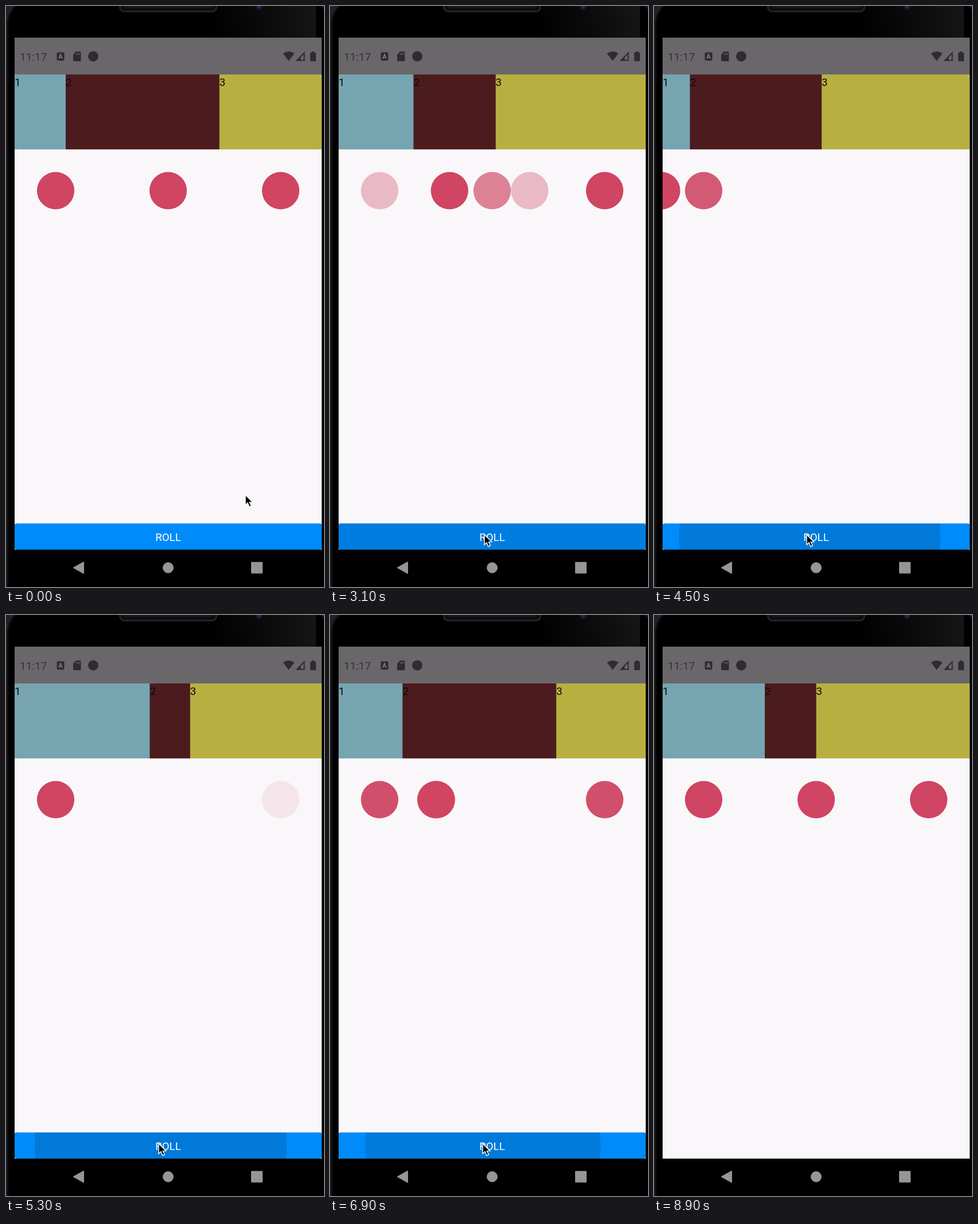
An HTML page that plays this animation: 554x1010 px, repeating every 9.6 s.

```html
<!DOCTYPE html>
<html lang="en">
<head>
<meta charset="utf-8">
<title>Roll</title>
<style>
  html, body { margin: 0; width: 100%; height: 100%; overflow: hidden; background: #000; }
  svg { display: block; }
  text { font-family: Roboto, "Liberation Sans", sans-serif; font-size: 18.7px; }
</style>
</head>
<body>
<svg width="554" height="1010" viewBox="0 0 554 1010">
  <defs>
    <clipPath id="screen"><rect x="15" y="55" width="535" height="890"/></clipPath>
    <clipPath id="pill"><rect x="15" y="899.500" width="535" height="45.500" rx="3"/></clipPath>
    <linearGradient id="glass" gradientUnits="userSpaceOnUse" x1="360" x2="550" y1="50" y2="10">
      <stop offset="0" stop-color="#000"/>
      <stop offset="0.6" stop-color="#0d0d0d"/>
      <stop offset="1" stop-color="#171717"/>
    </linearGradient>
    <radialGradient id="lens">
      <stop offset="0" stop-color="#25365c"/>
      <stop offset="0.5" stop-color="#121a2e"/>
      <stop offset="1" stop-color="#0b0c10" stop-opacity="0"/>
    </radialGradient>
  </defs>

  <!-- phone -->
  <rect width="554" height="1010" fill="#202123"/>
  <rect x="3.500" y="-14" width="558" height="1100" rx="46" fill="#000" stroke="#0b0b0c" stroke-width="3"/>
  <rect x="360" y="0" width="180" height="55" fill="url(#glass)"/>
  <rect x="198.500" y="-14" width="168" height="23.500" rx="7" fill="#0c0c0d" stroke="#29292b" stroke-width="2.500"/>
  <rect x="204" y="-14" width="157" height="18" rx="5" fill="#161617"/>
  <circle cx="441" cy="1.500" r="8" fill="url(#lens)"/>

  <!-- status bar -->
  <rect x="15" y="55" width="535" height="64" fill="#6a676a"/>
  <g fill="#2e2c30">
    <text x="24" y="95" fill="#353337" style="font-size:19px">11:17</text>
    <rect x="88.500" y="80.500" width="13" height="14.500" rx="2"/>
    <path d="M92 91.500 95 84l3 7.500M93 89.300h4" fill="none" stroke="#8b888b" stroke-width="1.300"/>
    <path d="M122 79h7a1.500 1.500 0 0 1 1.500 1.500v14a1.500 1.500 0 0 1-1.500 1.500h-10.500a1.500 1.500 0 0 1-1.500-1.500V84.500z"/>
    <path d="M122.500 81.500v3.500M125.200 81.500v3.500M128 81.500v3.500" stroke="#6a676a" stroke-width="1.200"/>
    <circle cx="152" cy="87.500" r="9"/>
    <path d="M482.500 82.500Q492.500 75.500 502.500 82.500L492.500 95.500Z"/>
    <path d="M520.500 79v16.500H504.500ZM518.500 84 513.500 89.200V93.500H518.500Z" fill-rule="evenodd"/>
    <path d="M533 79h4v1.800h2a1 1 0 0 1 1 1V95a1 1 0 0 1-1 1h-8a1 1 0 0 1-1-1V81.800a1 1 0 0 1 1-1h2z"/>
  </g>

  <!-- app -->
  <rect x="15" y="249" width="535" height="696" fill="#f9f7fa"/>
  <g clip-path="url(#screen)">
    <g id="boxes"></g>
    <g id="dots" fill="#cf4562"></g>
  </g>
  <g id="button">
    <g clip-path="url(#pill)">
      <rect x="15" y="899" width="535" height="46" fill="#008bfa"/>
      <circle id="ripple" cy="922"/>
    </g>
    <text x="282.500" y="930" text-anchor="middle" fill="#fff">ROLL</text>
  </g>

  <!-- navigation -->
  <g fill="#969696" stroke="#969696" stroke-linejoin="round">
    <path d="M118 976.500 135 967v19z" stroke-width="2"/>
    <circle cx="282.500" cy="976.500" r="9"/>
    <rect x="428" y="967.500" width="18" height="18" stroke-width="2"/>
  </g>

  <path id="cursor" d="M0 0V17.500L4 13.800 6.900 20.700 10.300 19.200 7.400 12.600H12.600Z"
        fill="#000" stroke="#fff" stroke-width="1.400"/>
</svg>
<script>
const LOOP = 9600, END = 8390, FADE = 500;
const LEFT = 15, WIDTH = 535;
const colors = ['#76a4b1', '#4c1b1e', '#b8af41'];

// Each roll: time, flex weights, circle ids from left to right,
// how long before it the finger went down, ids that vanish at once.
const rolls = [
  { at: -5000, flex: [1, 3, 2], ids: 'abc' },
  { at: 2929, flex: [1, 1, 2], ids: 'napc' },
  { at: 3690, flex: [3, 3, 1], ids: 'nc' },
  { at: 4440.3, flex: [1, 3, 3], ids: 'c' },
  { at: 5250, flex: [3, 1, 3], ids: 'cd' },
  { at: 6082.2, flex: [1, 2, 1], ids: 'cefdg' },
  { at: 6872.8, flex: [1, 3, 2], ids: 'f', lead: 62, lost: 'd' },
  { at: 7650, flex: [2, 3, 1], ids: 'fh' },
  { at: END, flex: [2, 1, 3], ids: 'fih' }
];

const cursorPath = [[0, 417, 850], [100, 417, 850], [1000, 389, 922], [1500, 389, 922],
  [2400, 269, 919], [3100, 269, 919], [3500, 266, 919], [LOOP, 266, 919]];

const $ = id => document.getElementById(id);
const clamp = v => Math.max(0, Math.min(1, v));
const mix = (a, b, p) => a + (b - a) * p;
const smooth = p => p * p * (3 - 2 * p);

function spring(t) {
  const s = 0.043 * t, z = 0.37, w = Math.sqrt(1 - z * z);
  return 1 - Math.exp(-z * s) * (Math.cos(w * s) + z / w * Math.sin(w * s));
}

function edges([a, b, c]) {
  const unit = WIDTH / (a + b + c);
  return [LEFT, LEFT + a * unit, LEFT + (a + b) * unit, LEFT + WIDTH];
}

const slot = (ids, id) => 86.5 + 392 * ids.indexOf(id) / Math.max(1, ids.length - 1);

function drawBoxes(from, to, p) {
  const a = edges(from.flex), b = edges(to.flex);
  const x = a.map((v, i) => mix(v, b[i], p));
  $('boxes').innerHTML = colors.map((color, i) =>
    `<rect x="${x[i]}" y="119" width="${x[i + 1] - x[i]}" height="130.3" fill="${color}"/>` +
    `<text x="${x[i]}" y="138.5" fill="#0c0c0c">${i + 1}</text>`).join('');
}

function drawDots(from, to, p, shown) {
  const dot = (x, alpha) => `<circle cx="${x}" cy="321" r="32.6" opacity="${alpha}"/>`;
  let fading = '', kept = '';
  for (const id of from.ids) {
    if (to.ids.includes(id)) kept += dot(mix(slot(from.ids, id), slot(to.ids, id), p), 1);
    else if (id !== to.lost) fading += dot(slot(from.ids, id), 1 - shown);
  }
  for (const id of to.ids)
    if (!from.ids.includes(id)) fading += dot(slot(to.ids, id), shown);
  $('dots').innerHTML = fading + kept;
}

function drawRipple(t) {
  let alpha = 0;
  for (const { at, lead = 54 } of rolls) {
    const age = t - at, held = age + lead;
    if (held < 0 || age > 380) continue;
    const rest = Math.exp(-0.0146 * held);
    $('ripple').setAttribute('cx', 282.5 - 60 * rest);
    $('ripple').setAttribute('r', 280 * (1 - rest));
    alpha = 0.135 * clamp(held / 98) * clamp(1 - (age - 100) / 280);
  }
  $('ripple').setAttribute('opacity', alpha);
}

function drawCursor(t) {
  const i = cursorPath.findIndex(k => k[0] > t);
  const [t0, x0, y0] = cursorPath[i - 1], [t1, x1, y1] = cursorPath[i];
  const p = smooth((t - t0) / (t1 - t0));
  $('cursor').setAttribute('transform', `translate(${mix(x0, x1, p)} ${mix(y0, y1, p)})`);
}

function draw(t) {
  const k = rolls.filter(r => r.at <= t).length - 1;
  const to = rolls[k], from = rolls[Math.max(0, k - 1)];
  const age = t - to.at, p = spring(age);
  drawBoxes(from, to, p);
  drawDots(from, to, p, clamp(age / FADE));
  drawRipple(t);
  drawCursor(t);
  const display = t < END ? '' : 'none';
  $('button').style.display = display;
  $('cursor').style.display = display;
}

const start = performance.now();
function tick() {
  draw((performance.now() - start) % LOOP);
  requestAnimationFrame(tick);
}
tick();
</script>
</body>
</html>
```
